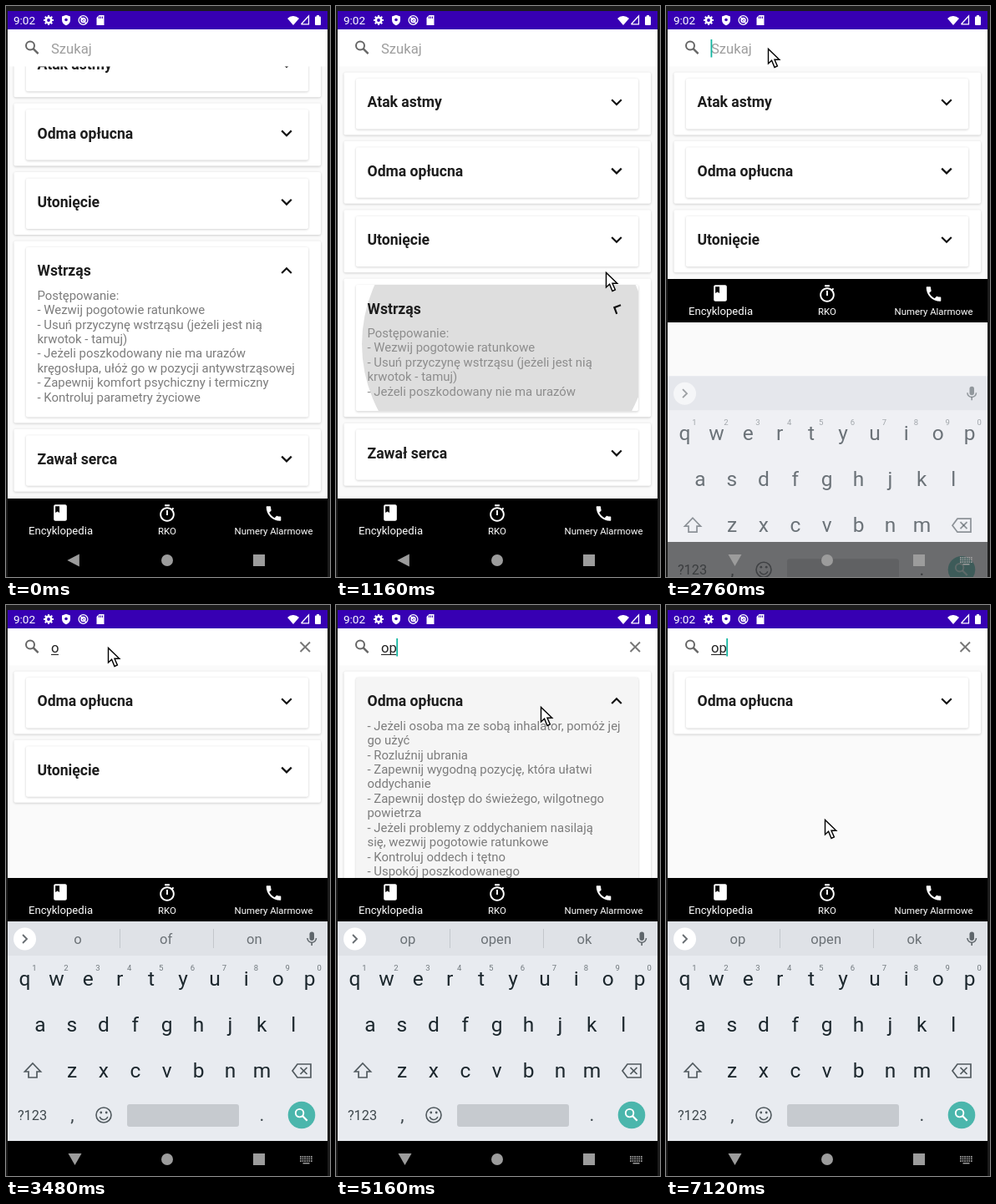
An HTML page with a canvas that plays this animation: 388 px wide and 684 px high, repeating every 7160 ms.

```html
<!DOCTYPE html>
<html lang="pl">
<head>
<meta charset="utf-8">
<title>Encyklopedia</title>
<style>
html, body { margin: 0; width: 100%; height: 100%; overflow: hidden; background: #1c1c1c; }
canvas { display: block; }
</style>
</head>
<body>
<canvas id="stage" width="388" height="684"></canvas>
<script>
const ctx = document.getElementById('stage').getContext('2d');
const LOOP = 7160, FONT = 'Roboto, Arial, sans-serif';
const SCREEN_W = 383, LINE = 17.45, CARD_H = 75, PITCH = 82.4, LIST_TOP = 79.4;

const CARDS = [
  { title: 'Atak astmy' },
  { title: 'Odma opłucna', extra: 213, lines: [
    '- Jeżeli osoba ma ze sobą inhalator, pomóż jej', 'go użyć',
    '- Rozluźnij ubrania',
    '- Zapewnij wygodną pozycję, która ułatwi', 'oddychanie',
    '- Zapewnij dostęp do świeżego, wilgotnego', 'powietrza',
    '- Jeżeli problemy z oddychaniem nasilają', 'się, wezwij pogotowie ratunkowe',
    '- Kontroluj oddech i tętno', '- Uspokój poszkodowanego', '- Nie zostawiaj go samego'] },
  { title: 'Utonięcie' },
  { title: 'Wstrząs', extra: 143, lines: [
    'Postępowanie:', '- Wezwij pogotowie ratunkowe',
    '- Usuń przyczynę wstrząsu (jeżeli jest nią', 'krwotok - tamuj)',
    '- Jeżeli poszkodowany nie ma urazów', 'kręgosłupa, ułóż go w pozycji antywstrząsowej',
    '- Zapewnij komfort psychiczny i termiczny', '- Kontroluj parametry życiowe'] },
  { title: 'Zawał serca' }
];

const TAPS = [
  { card: 3, at: 1037, to: 0, x: 323, y: 345 },
  { card: 3, at: 1816, to: 1, x: 300, y: 368 },
  { card: 1, at: 4800, to: 1, x: 245, y: 122 },
  { card: 1, at: 5720, to: 0, x: 235, y: 128 }
];

// time, x, y of the mouse pointer
const POINTER = [
  [280, 390, 600], [880, 323, 319], [1240, 323, 319], [1680, 300, 355], [1840, 300, 355],
  [2000, 157, 108], [2240, 122, 51], [3840, 122, 51], [4520, 245, 122],
  [5240, 245, 122], [5640, 235, 128], [6000, 235, 128], [6640, 190, 257]
];

const KEYBOARD_AT = 2680, TYPE_O = 3400, TYPE_P = 3680;

const BOOK = new Path2D('M18 2H6c-1.1 0-2 .9-2 2v16c0 1.1.9 2 2 2h12c1.1 0 2-.9 2-2V4c0-1.1-.9-2-2-2zM6 4h5v8l-2.5-1.5L6 12V4z');
const TIMER = new Path2D('M15 1H9v2h6V1zm-4 13h2V8h-2v6zm8.03-6.61l1.42-1.42c-.43-.51-.9-.99-1.41-1.41l-1.42 1.42C16.07 4.74 14.12 4 12 4c-4.97 0-9 4.03-9 9s4.02 9 9 9 9-4.03 9-9c0-2.12-.74-4.07-1.97-5.61zM12 20c-3.87 0-7-3.13-7-7s3.13-7 7-7 7 3.13 7 7-3.13 7-7 7z');
const PHONE = new Path2D('M6.62 10.79c1.44 2.83 3.76 5.14 6.59 6.59l2.2-2.2c.27-.27.67-.36 1.02-.24 1.12.37 2.33.57 3.57.57.55 0 1 .45 1 1V20c0 .55-.45 1-1 1-9.39 0-17-7.61-17-17 0-.55.45-1 1-1h3.5c.55 0 1 .45 1 1 0 1.25.2 2.45.57 3.57.11.35.03.74-.25 1.02l-2.2 2.2z');
const SHIELD = new Path2D('M0-6.3L5-4.4V-.5C5 3 3 5.2 0 6.3C-3 5.2-5 3-5-.5V-4.4Z');
const ARROW = new Path2D('M.5.5V18L4.6 14.2L8 22.5L11.4 21L8 13.2H13.8Z');
const SHIFT = new Path2D('M0-9L9.5 1H5V8H-5V1H-9.5Z');
const ERASE = new Path2D('M-11 0L-5-8H11V8H-5Z');

const clamp = (v, a = 0, b = 1) => Math.min(b, Math.max(a, v));
const mix = (a, b, p) => a + (b - a) * p;
const ease = p => (1 - Math.cos(Math.PI * clamp(p))) / 2;

function rect(x, y, w, h, fill, r = 0) {
  ctx.fillStyle = fill;
  ctx.beginPath();
  ctx.roundRect(x, y, w, h, r);
  ctx.fill();
}
const band = (y, h, fill) => rect(2, y, SCREEN_W, h, fill);
function disc(x, y, r, fill) {
  ctx.fillStyle = fill;
  ctx.beginPath();
  ctx.arc(x, y, r, 0, 7);
  ctx.fill();
}
function ring(x, y, r, color, width, from = 0, to = 2 * Math.PI) {
  ctx.strokeStyle = color;
  ctx.lineWidth = width;
  ctx.beginPath();
  ctx.arc(x, y, r, from, to);
  ctx.stroke();
}
function line(color, width, ...pts) {
  ctx.strokeStyle = color;
  ctx.lineWidth = width;
  ctx.beginPath();
  for (let i = 0; i < pts.length; i += 2) ctx.lineTo(pts[i], pts[i + 1]);
  ctx.stroke();
}
function poly(fill, ...pts) {
  ctx.fillStyle = fill;
  ctx.beginPath();
  for (let i = 0; i < pts.length; i += 2) ctx.lineTo(pts[i], pts[i + 1]);
  ctx.fill();
}
function text(s, x, y, size, color, align = 'left', weight = 400) {
  ctx.font = `${weight} ${size}px ${FONT}`;
  ctx.textAlign = align;
  ctx.fillStyle = color;
  ctx.fillText(s, x, y);
}
function at(x, y, draw) {
  ctx.save();
  ctx.translate(x, y);
  draw();
  ctx.restore();
}
function clipTo(x, y, w, h, draw) {
  ctx.save();
  ctx.beginPath();
  ctx.rect(x, y, w, h);
  ctx.clip();
  draw();
  ctx.restore();
}
function icon(path, x, y, color) {
  at(x, y, () => {
    ctx.scale(.978, .978);
    ctx.translate(-12, -12);
    ctx.fillStyle = color;
    ctx.fill(path, 'evenodd');
  });
}
function magnifier(x, y, s, color) {
  ring(x - 2 * s, y - 2 * s, 5 * s, color, 2 * s);
  line(color, 2.4 * s, x + 1.6 * s, y + 1.6 * s, x + 7.6 * s, y + 7.6 * s);
}

function openness(card, t) {
  let v = card === 3 ? 1 : 0;
  for (const tap of TAPS)
    if (tap.card === card && t >= tap.at) v = mix(1 - tap.to, tap.to, ease((t - tap.at) / 300));
  return v;
}

function ripple(card, t, x, y, w, h) {
  for (const tap of TAPS) {
    const age = t - tap.at + 40;
    if (tap.card !== card || age < 0 || age > 460) continue;
    const p = 1 - (1 - clamp(age / 225)) ** 2;
    clipTo(x, y, w, h, () => {
      ctx.globalAlpha = 1 - clamp((age - 260) / 200);
      disc(mix(tap.x, x + w / 2, p), mix(tap.y, y + h / 2, p), p * Math.hypot(w, h) / 2, '#dedede');
    });
  }
}

function panel(x, y, w, h) {
  ctx.save();
  ctx.shadowColor = 'rgba(0,0,0,.2)';
  ctx.shadowBlur = 3;
  ctx.shadowOffsetY = .8;
  rect(x, y, w, h, '#fff', 2);
  ctx.restore();
}

function drawCard(id, y, t) {
  const card = CARDS[id], open = openness(id, t);
  const h = CARD_H + (card.extra || 0) * open;
  panel(9.5, y, 367.5, h);
  panel(24, y + 7.5, 338, h - 14.5);
  ripple(id, t, 24, y + 7.5, 338, h - 14.5);
  text(card.title, 37.5, y + 42, 17.6, '#1d1d1d', 'left', 700);
  at(336, y + 35.7, () => {
    ctx.rotate(open * Math.PI);
    line('#111', 2.2, -5.8, -2.9, 0, 2.9, 5.8, -2.9);
  });
  if (open > 0) clipTo(24, y + 50, 338, Math.max(0, h - 72), () => {
    ctx.globalAlpha = mix(.55, 1, open);
    card.lines.forEach((s, i) => text(s, 37.5, y + 70.2 + i * LINE, 14.9, '#7c7c7c'));
  });
  return h;
}

function drawList(t, bottom) {
  const shown = t < TYPE_O ? [0, 1, 2, 3, 4] : t < TYPE_P ? [1, 2] : [1];
  const scroll = t < 1500 ? Math.max(0, 143 * openness(3, t) - 97.8) : 0;
  clipTo(2, 72, SCREEN_W, bottom - 72, () => {
    let y = LIST_TOP - scroll;
    for (const id of shown) y += drawCard(id, y, t) + PITCH - CARD_H;
  });
}

function drawStatus() {
  band(6, 22, '#3700b3');
  text('9:02', 9, 22, 13.5, '#fff');
  ring(51, 17, 3.2, '#fff', 2.6);
  for (let i = 0; i < 8; i++) {
    const c = Math.cos(i * Math.PI / 4), s = Math.sin(i * Math.PI / 4);
    line('#fff', 2, 51 + 4 * c, 17 + 4 * s, 51 + 6 * c, 17 + 6 * s);
  }
  at(72, 17, () => { ctx.fillStyle = '#fff'; ctx.fill(SHIELD); });
  disc(72, 16.5, 1.8, '#3700b3');
  ring(92.5, 17, 5.4, '#fff', 1.3);
  ring(92.5, 17, 2.4, '#fff', 1.6);
  line('#fff', 1.2, 89, 13, 96, 21);
  poly('#fff', 108.5, 14, 111.5, 11, 117.5, 11, 117.5, 23, 108.5, 23);
  for (const x of [111.5, 113.5, 115.5]) line('#3700b3', 1, x, 12.5, x, 15);
  ctx.fillStyle = '#fff';
  ctx.beginPath();
  ctx.moveTo(344, 23);
  ctx.arc(344, 21.5, 9.5, -Math.PI * .76, -Math.PI * .24);
  ctx.fill();
  line('#fff', 1.3, 353.5, 21.8, 362.5, 21.8, 362.5, 12, 353.5, 21.8);
  rect(370, 12.5, 7, 10.5, '#fff', 1);
  rect(372, 11, 3, 2, '#fff');
}

function drawSearch(t) {
  band(28, 44.5, '#fff');
  magnifier(31, 49.5, 1, '#666');
  const typed = t < TYPE_O ? '' : t < TYPE_P ? 'o' : 'op';
  text(typed || 'Szukaj', 54, 57, 16.6, typed ? '#222' : '#9e9e9e');
  const end = 53.5 + (typed && ctx.measureText(typed).width);
  if (typed) {
    line('#222', 1, 54, 59.5, end, 59.5);
    line('#777', 1.9, 352.5, 44.5, 364, 56);
    line('#777', 1.9, 364, 44.5, 352.5, 56);
  }
  if (t >= KEYBOARD_AT && (t - KEYBOARD_AT) % 1000 < 500) rect(end, 40, 1.8, 21.5, '#12b5a0');
}

function drawTabs(y) {
  band(y, 52, '#000');
  icon(BOOK, 65, y + 17, '#fff');
  icon(TIMER, 193, y + 18, '#fff');
  icon(PHONE, 320.5, y + 18, '#fff');
  text('Encyklopedia', 65.5, y + 43, 13.1, '#fff', 'center');
  text('RKO', 193, y + 43, 11.4, '#fff', 'center');
  text('Numery Alarmowe', 320.5, y + 43, 11.4, '#fff', 'center');
}

function keyRow(chars, x, y) {
  [...chars].forEach((c, i) => text(c, x + i * 37.9, y, 24.5, '#1c272d', 'center'));
}

function drawKeyboard(t) {
  band(379, 264, '#e8ebf0');
  band(379, 41, '#dfe2e7');
  disc(22.5, 400, 13.5, '#fff');
  line('#666c70', 1.8, 20, 395, 25, 400, 20, 405);
  if (t >= TYPE_O) {
    const words = t < TYPE_P ? ['o', 'of', 'on'] : ['op', 'open', 'ok'];
    words.forEach((s, i) => text(s, 86 + i * 105.7, 406, 16.6, '#6b7176', 'center'));
    for (const x of [136.5, 248.5]) line('#c3c7cc', 1, x, 388, x, 411);
  }
  rect(363.5, 391.5, 5.5, 10.5, '#5f666b', 2.7);
  ring(366.2, 399, 5.3, '#5f666b', 1.5, 0, Math.PI);
  line('#5f666b', 1.6, 366.2, 404, 366.2, 408);

  keyRow('qwertyuiop', 22.5, 455.5);
  keyRow('asdfghjkl', 41, 510.5);
  keyRow('zxcvbnm', 79, 565.5);
  for (let i = 0; i < 10; i++) text((i + 1) % 10, 34 + i * 37.9, 437.5, 9.5, '#70787d', 'center');
  ctx.strokeStyle = '#50595e';
  ctx.lineWidth = 1.7;
  at(32, 558, () => ctx.stroke(SHIFT));
  at(354, 558, () => ctx.stroke(ERASE));
  line('#50595e', 1.7, 352.5, 554, 360.5, 562);
  line('#50595e', 1.7, 360.5, 554, 352.5, 562);
  text('?123', 31.5, 616.5, 16.3, '#3f484d', 'center');
  text(',', 79.5, 618, 22, '#3f484d', 'center');
  text('.', 306.5, 618, 22, '#3f484d', 'center');
  ring(117, 611, 9, '#50595e', 1.6);
  ring(117, 611.5, 5, '#50595e', 1.5, .3, Math.PI - .3);
  disc(113.8, 608, 1.4, '#50595e');
  disc(120.2, 608, 1.4, '#50595e');
  rect(145, 598, 134, 27, '#c6cacf', 3);
  disc(354, 611, 16.3, '#4bb6ac');
  magnifier(353.5, 610.5, .95, '#fff');
}

function drawSystemBar(shown, alpha) {
  band(642, 42, `rgba(0,0,0,${alpha})`);
  const gray = '#9c9c9c';
  if (shown) {
    poly(gray, 74.5, 657, 90.5, 657, 82.5, 671);
    for (let r = 0; r < 3; r++)
      for (let c = 0; c < 6; c++) rect(352 + c * 2.6, 660 + r * 2.6, 1.7, 1.7, gray);
    rect(355.5, 668, 8, 1.5, gray);
  } else poly(gray, 73.3, 664, 87.8, 656.5, 87.8, 671.5);
  disc(193, 664, 7, gray);
  rect(296, 657, 14, 14, gray);
}

function drawPointer(t) {
  if (t < POINTER[0][0]) return;
  let i = POINTER.findIndex(k => k[0] > t);
  if (i < 0) i = POINTER.length;
  const a = POINTER[i - 1], b = POINTER[i] || a;
  const p = a === b ? 0 : ease((t - a[0]) / (b[0] - a[0]));
  at(Math.round(mix(a[1], b[1], p)), Math.round(mix(a[2], b[2], p)), () => {
    ctx.fillStyle = '#fff';
    ctx.fill(ARROW);
    ctx.strokeStyle = '#000';
    ctx.lineWidth = 1.4;
    ctx.stroke(ARROW);
  });
}

function draw(t) {
  const typing = t >= KEYBOARD_AT, slide = ease((t - KEYBOARD_AT) / 160);
  const tabsY = typing ? 327 : 590;
  rect(0, 0, 388, 684, '#1c1c1c');
  band(28, 656, '#fafafa');
  drawList(t, tabsY);
  drawSearch(t);
  drawStatus();
  drawTabs(tabsY);
  if (typing) clipTo(2, 379, SCREEN_W, 305, () => {
    ctx.globalAlpha = slide ** .7;
    ctx.translate(0, 131 * (1 - slide));
    drawKeyboard(t);
  });
  drawSystemBar(typing, 1 - .45 * Math.sin(Math.PI * slide));
  drawPointer(t);
}

const begin = performance.now();
function tick() {
  draw((performance.now() - begin) % LOOP);
  requestAnimationFrame(tick);
}
tick();
</script>
</body>
</html>
```
